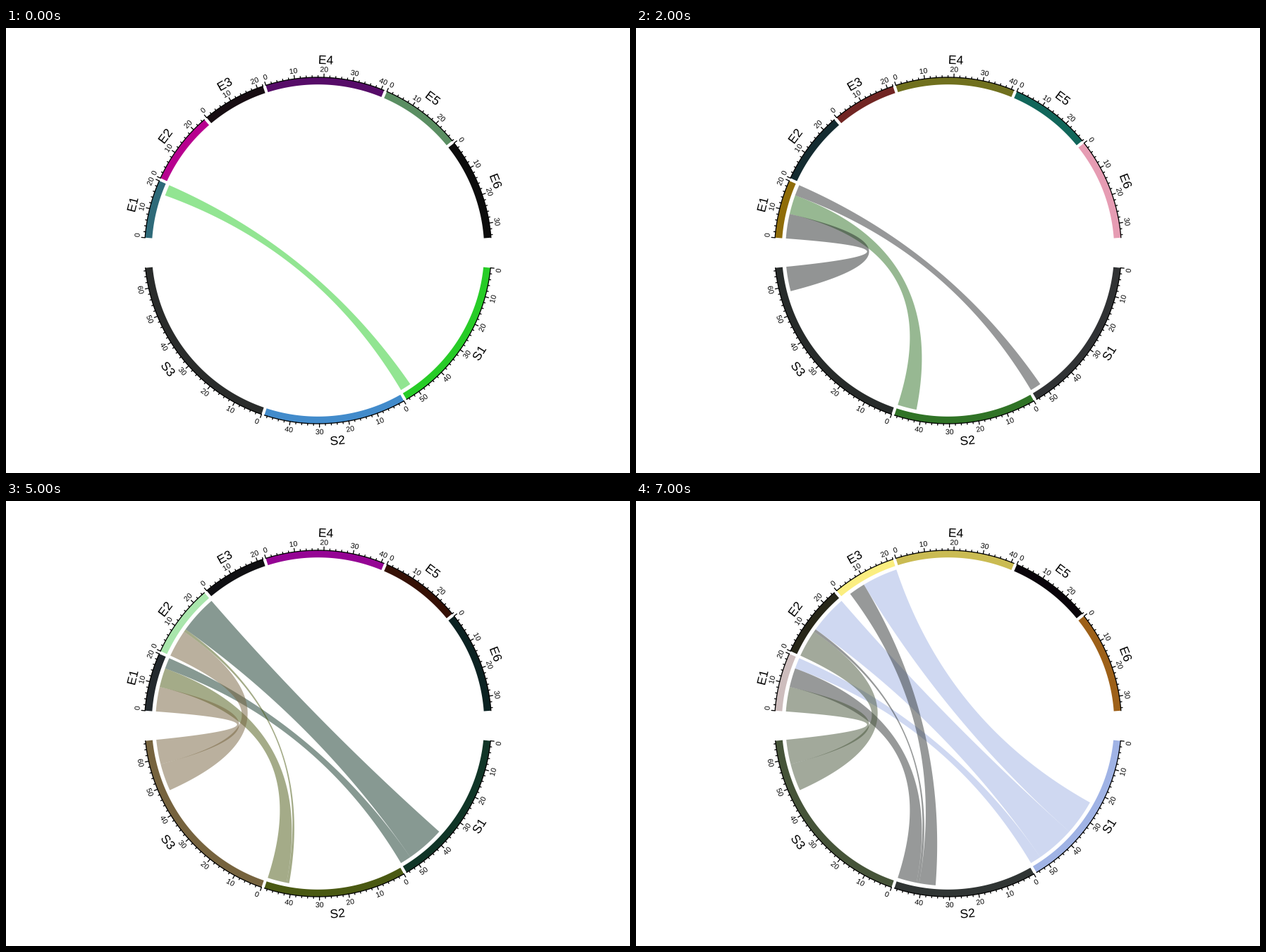
Write a matplotlib script that moves like this. It is 885 by 632 pixels and loops after 8 s.

```python
import numpy as np
import matplotlib.pyplot as plt
from matplotlib.animation import FuncAnimation
from matplotlib.collections import LineCollection
from matplotlib.patches import PathPatch, Polygon
from matplotlib.textpath import TextPath
from matplotlib.transforms import Affine2D

W, H, DPI = 885, 632, 64
CX, CY = W / 2, H / 2
R_OUT, R_IN, R_LINK = 246, 235.8, 230.5
R_NUM, R_NAME = 257.4, 271
PX = 72 / DPI

ROWS = ["S1", "S2", "S3"]
COLS = ["E1", "E2", "E3", "E4", "E5", "E6"]
FLOWS = np.array([
    [4, 14, 13, 17, 5, 2],
    [7, 1, 6, 8, 12, 15],
    [9, 10, 3, 16, 11, 18],
])
SMALL_GAP, BIG_GAP = 1, 10
UNIT = (360 - 2 * BIG_GAP - 7 * SMALL_GAP) / (2 * FLOWS.sum())

# One palette per step, in the order S1-S3, E1-E6
PALETTES = [p.split() for p in (
    "27cc27 428bcb 2a2c2b 2e6a79 b7008f 170d12 560c68 5a8e62 0c0c0c",
    "4a5560 7a6a48 33302e 4c6a58 6a3a4c 2c3440 80704c 3c5a60 5c4c48",
    "303234 307326 272b2a 8f6c08 142b30 712523 70701e 11665a e69cb3",
    "5a5e58 4a5a6c 5c4238 3c4a52 70603c 4c6448 6a4c60 30403c 7a6c60",
    "5b5854 2f4838 3d1a0d 336657 a00c20 97d394 b4954a 020203 390f39",
    "103527 4a5912 76633e 23292e a9e6ac 0f0f12 950494 351005 0b2222",
    "602010 cfb251 18131a 435848 0b0309 a26f5c 968abf ddf0c8 c4c4c4",
    "a0b3e5 303534 465439 cdbdbd 272618 fbee80 cabb52 09040a 9d6018",
)]


def polar(deg, r):
    a = np.radians(deg)
    return np.column_stack([CX + r * np.cos(a), CY - r * np.sin(a)])


def point(deg, r):
    return polar(np.array([deg]), r)[0]


def arc(a, b, r):
    return polar(np.linspace(a, b, 120), r)


def curve(a, b):
    """Quadratic curve from angle a to b, pulled to the centre."""
    t = np.linspace(0, 1, 120)[:, None]
    mid = np.array([CX, CY])
    p, q = point(a, R_LINK), point(b, R_LINK)
    return (1 - t) ** 2 * p + 2 * t * (1 - t) * mid + t ** 2 * q


def glyphs(text, size):
    return TextPath((0, 0), text, size=size, prop={"family": "Liberation Sans"})


def put_text(path, deg, r):
    """Centre the text at (deg, r), along the circle and never upside down."""
    box = path.get_extents()
    turn = deg - 90 if 0 < deg % 360 < 180 else deg + 90
    place = (Affine2D()
             .translate(-(box.x0 + box.x1) / 2, -(box.y0 + box.y1) / 2)
             .rotate_deg(turn).scale(1, -1).translate(*point(deg, r)))
    ax.add_patch(PathPatch(place.transform_path(path), fc="black", lw=0))


def draw_axis(start, size):
    end = start - size * UNIT
    lines = [arc(start, end, R_OUT)]
    for v in range(0, size + 1, 2):
        deg = start - v * UNIT
        length = 2.5 if v % 10 else 5
        lines.append(np.array([point(deg, R_OUT), point(deg, R_OUT + length)]))
        if v % 10 == 0:
            path = glyphs(str(v), 10.5)
            # Keep the number within its sector
            half = np.degrees((path.get_extents().width / 2 + 0.3) / R_NUM)
            put_text(path, np.clip(deg, end + half, start - half), R_NUM)
    ax.add_collection(LineCollection(lines, colors="black", linewidths=1.3 * PX,
                                     capstyle="round", zorder=3))


fig = plt.figure(figsize=(W / DPI, H / DPI), dpi=DPI, facecolor="white")
ax = fig.add_axes([0, 0, 1, 1])
ax.set_xlim(0, W)
ax.set_ylim(H, 0)
ax.axis("off")

# Sectors run clockwise from the right
starts, bands = {}, []
row_span = FLOWS.sum() * UNIT + 2 * SMALL_GAP
deg = -(180 - row_span) / 2
sizes = list(FLOWS.sum(axis=1)) + list(FLOWS.sum(axis=0))
for name, size in zip(ROWS + COLS, sizes):
    starts[name] = deg
    end = deg - size * UNIT
    ring = np.vstack([arc(deg, end, R_OUT), arc(end, deg, R_IN)])
    bands.append(ax.add_patch(Polygon(ring, lw=0)))
    draw_axis(deg, int(size))
    put_text(glyphs(name, 17.5), (deg + end) / 2, R_NAME)
    deg = end - (BIG_GAP if name == "S3" else SMALL_GAP)

# Links, column by column; each sector is filled from its far end
links = []
for j, col in enumerate(COLS):
    for i, row in enumerate(ROWS):
        if len(links) == len(PALETTES):
            break
        n = FLOWS[i, j]
        c0 = starts[col] - FLOWS[i + 1:, j].sum() * UNIT
        r0 = starts[row] - FLOWS[i, j + 1:].sum() * UNIT
        c1, r1 = c0 - n * UNIT, r0 - n * UNIT
        shape = np.vstack([arc(c0, c1, R_LINK), curve(c1, r0),
                           arc(r0, r1, R_LINK), curve(r1, c0)])
        patch = ax.add_patch(Polygon(shape, lw=0, alpha=0.5, zorder=2))
        links.append((patch, i))


def update(step):
    colors = ["#" + c for c in PALETTES[step]]
    for band, color in zip(bands, colors):
        band.set_facecolor(color)
    for k, (patch, row) in enumerate(links):
        patch.set_visible(k <= step)
        patch.set_facecolor(colors[row])
    return bands + [patch for patch, _ in links]


anim = FuncAnimation(fig, update, frames=len(PALETTES), interval=1000, repeat=True)
plt.show()
```
